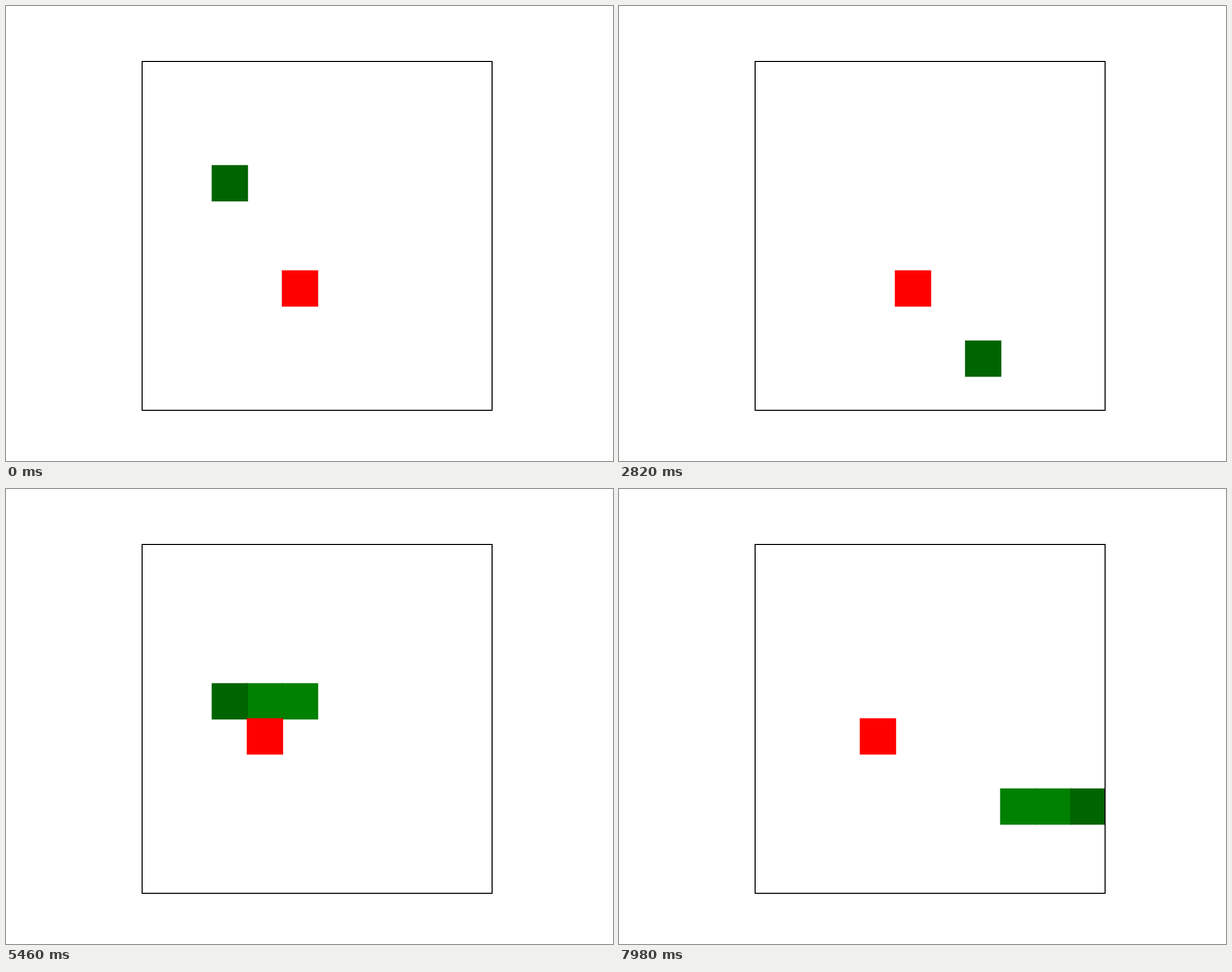
Write an HTML page with a canvas that moves like this. It is 640 px wide and 480 px high and loops after 8 s.

```html
<!DOCTYPE html>
<html lang="en">
<head>
<meta charset="utf-8">
<title>Snake</title>
<style>
  html, body { margin: 0; width: 100%; height: 100%; overflow: hidden; background: #fff; }
  canvas { display: block; width: 640px; height: 480px; }
</style>
</head>
<body>
<canvas id="stage" width="640" height="480"></canvas>
<script>
const ctx = document.getElementById('stage').getContext('2d');
const LOOP = 8000, TICK = 60;

// Each leg is a heading and a number of cells.
const ROUTE = 'R7 U1 L2 D2 R2 U1 L9 U1 R7 U2 L1 D9 R1 U1 L7 U1 R9 U1 L9 ' +
              'U1 R9 U1 L9 U1 R9 U1 L1 D7 R1 U1 L9 U1 R9';
const HEADING = { R: [1, 0], L: [-1, 0], U: [0, -1], D: [0, 1] };
const FOODS = [[4, 6], [6, 5], [3, 5]];

const path = [[2, 3]];
for (const leg of ROUTE.split(' ')) {
  const [dx, dy] = HEADING[leg[0]];
  for (let i = 0; i < +leg[1]; i++) {
    const [x, y] = path[path.length - 1];
    path.push([x + dx, y + dy]);
  }
}

// Number of foods eaten by each tick.
let meals = 0;
const eaten = path.map(cell => {
  if (String(cell) === String(FOODS[meals])) meals++;
  return meals;
});

// Grid lines snapped to pixel centres.
const gridX = col => Math.round(143.45 + 36.9 * col) + 0.5;
const gridY = row => Math.round(57.9 + 36.85 * row) + 0.5;

function box(col, row, size, lineWidth, stroke, fill) {
  const x = gridX(col), y = gridY(row);
  const w = gridX(col + size) - x, h = gridY(row + size) - y;
  ctx.lineWidth = lineWidth;
  ctx.strokeStyle = stroke;
  if (fill) {
    ctx.fillStyle = fill;
    ctx.fillRect(x, y, w, h);
  }
  ctx.strokeRect(x, y, w, h);
}

const cell = ([col, row], color) => box(col, row, 1, 1.39, color, color);

function draw(tick) {
  ctx.fillStyle = '#fff';
  ctx.fillRect(0, 0, 640, 480);

  ctx.save();
  ctx.beginPath();
  ctx.rect(143, 58, 370, 369);
  ctx.clip();
  for (let i = eaten[tick]; i > 0; i--) cell(path[tick - i], '#008000');
  cell(path[tick], '#006400');
  cell(FOODS[eaten[tick]], '#f00');
  ctx.restore();

  box(0, 0, 10, 1.11, '#000');
}

let shown = 0;
function play() {
  const tick = Math.floor(performance.now() % LOOP / TICK);
  if (tick !== shown) draw(shown = tick);
  requestAnimationFrame(play);
}
draw(shown);
play();
</script>
</body>
</html>
```
